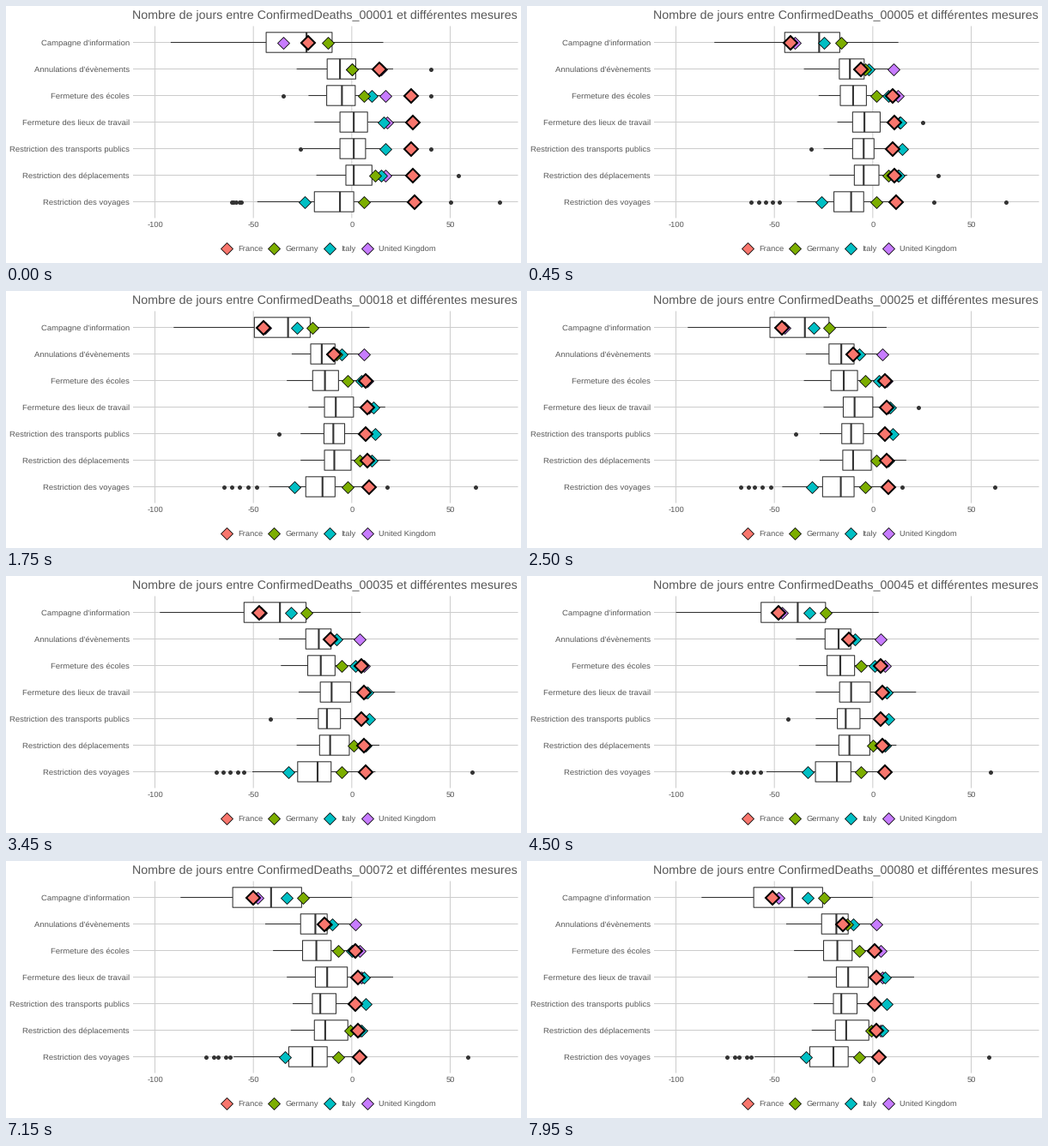
These frames come from a looping animation (600x300 px, 8 s). A matplotlib script:

```python
import numpy as np
import matplotlib.pyplot as plt
from matplotlib.animation import FuncAnimation
from matplotlib.collections import LineCollection, PolyCollection

W, H, DPI = 600, 300, 100
PT = 72 / DPI                      # points per pixel
FRAMES, STEP, LAST = 160, 50, 80
INK, LINE, GRID = "#575757", "#333333", "#cccccc"

plt.rcParams["font.family"] = "Liberation Sans"
plt.rcParams["text.hinting"] = "none"
fig = plt.figure(figsize=(W / DPI, H / DPI), dpi=DPI, facecolor="white")
ax = fig.add_axes([0, 0, 1, 1])
ax.set_xlim(0, W)
ax.set_ylim(H, 0)
ax.axis("off")

# One state per death count; states are spread evenly over the frames
STATES = np.arange(1, LAST + 1)
STATE_FRAMES = np.round((STATES - 1) * (FRAMES - 1) / (LAST - 1))


def px(days):
    return 402.85 + 2.293 * np.asarray(days, float)


def row_y(row):
    return 42.5 + 31.0 * np.asarray(row, float)


def drift(first, early, late, grid=1.0):
    """Logarithmic drift through states 1, 11 and 72, in whole data steps."""
    v = np.interp(np.log(STATES), np.log([1, 11, 72]), [first, early, late])
    return np.round(v / grid) * grid


def label(x, y, s, size, ha):
    return ax.text(x, y, s, fontsize=size * PT, color=INK, ha=ha, va="baseline")


def diamond(color, x=(), y=(), size=10.3, edge=0.8):
    return ax.plot(x, y, "D", ms=size * PT, mfc=color, mec="black",
                   mew=edge * PT, zorder=6, snap=False)[0]


class Measure:
    """Box plot: strays within 1.5 box widths stretch a whisker, others are dots."""

    def __init__(self, name, low, q1, med, q3, high, strays=()):
        self.name = name
        q1, med, q3 = (drift(*q, grid=0.25) for q in (q1, med, q3))
        low, high = drift(*low), drift(*high)
        reach = 1.5 * (q3 - q1)
        self.dots = []
        for *keys, until in strays:
            v = drift(*keys)
            live = STATES <= until
            inside = (v >= q1 - reach) & (v <= q3 + reach)
            low = np.where(live & inside, np.minimum(low, v), low)
            high = np.where(live & inside, np.maximum(high, v), high)
            self.dots.append(np.where(live & ~inside, v, np.nan))
        self.box = [low, q1, med, q3, np.maximum(high, q3)]


MEASURES = [
    Measure("Campagne d'information",
            (-70, -75, -87), (-43.5, -45.25, -60.5), (-23, -29, -41),
            (-10, -19.5, -25.5), (16, 12, 0), [(-92, -85, -105, 59)]),
    Measure("Annulations d'évènements",
            (-28, -25, -44), (-12.5, -19, -26), (-6, -14, -18.5),
            (2, -7, -12.5), (21, 6, 2), [(40, 6, 2, 3), (-28, -38, -38, 14)]),
    Measure("Fermeture des écoles",
            (-22, -30, -40), (-12.75, -18, -25), (-5, -12, -18),
            (1.75, -5.25, -10.5), (17, 8, 4), [(40, 8, 4, 3), (-35, -35, -35, 3)]),
    Measure("Fermeture des lieux de travail",
            (-19, -18, -33), (-6, -12, -18.5), (1, -6.5, -12.5),
            (8, 2, -2.25), (18, 13, 5), [(29, 24, 21, LAST)]),
    Measure("Restriction des transports publics",
            (-25, -25, -30), (-6, -12, -20), (1, -7, -16),
            (7, -2, -8), (17, 7, 6), [(40, 7, 6, 3), (-26, -34, -46, 50)]),
    Measure("Restriction des déplacements",
            (-18, -24, -31), (-3, -12, -19), (1, -7, -13.5),
            (10.25, 0.25, -2), (30, 12, 4), [(54, 24, 8, LAST)]),
    Measure("Restriction des voyages",
            (-48, -35, -60), (-19, -20, -32), (-6, -13, -20),
            (1, -7, -12.5), (31, 9, 4),
            [(75, 64, 59, LAST), (50, 23, 5, LAST)]
            + [(-61 + 1.2 * k, -62 + 4.6 * k, -73.5 + 3 * k, LAST)
               for k in range(5)]),
]
BOXES = np.array([m.box for m in MEASURES])
DOTS = np.array([d for m in MEASURES for d in m.dots])
DOT_ROWS = [r for r, m in enumerate(MEASURES) for _ in m.dots]


class Country:
    """Whole days drop along a bent line; each measure has a fixed offset."""

    def __init__(self, name, color, bends, offsets, **style):
        self.name, self.color = name, color
        self.path = np.round(np.interp(STATES, *zip(*bends)))
        self.rows = list(offsets)
        self.offsets = np.array(list(offsets.values()))
        self.marks = diamond(color, **style)

    def place(self, t):
        day = np.interp(t, STATES, self.path)
        self.marks.set_data(px(day + self.offsets), row_y(self.rows))


COUNTRIES = [
    Country("United Kingdom", "#C77CFF",
            [(1, 15), (3, 12), (11, 6.4), (26, 5), (72, 2), (80, 1.6)],
            {0: -50, 1: 0, 2: 2, 3: 3, 5: 2}),
    Country("Italy", "#00BFC4",
            [(1, 16), (3, 14), (12, 12.6), (26, 9), (46, 6.8), (80, 5.6)],
            {0: -39, 1: -16, 2: -6, 3: 0, 4: 1, 5: -1, 6: -40}),
    Country("Germany", "#7CAE00",
            [(1, 6), (4, 3), (7, 1), (12, 0), (26, -4), (45, -6), (72, -7)],
            {0: -18, 1: -6, 2: 0, 5: 6, 6: 0}),
    Country("France", "#F8766D",
            [(1, 30), (2, 18), (3, 13), (5, 10), (11, 7.4), (26, 6), (80, 1)],
            {0: -52, 1: -16, 2: 0, 3: 1, 4: 0, 5: 1, 6: 2}, size=10.8, edge=2),
]

# Grid, axis labels and legend
for d in range(-100, 51, 50):
    ax.plot([px(d)] * 2, [24, 247], color=GRID, lw=PT, zorder=1, snap=False)
    label(px(d), 258, str(d), 9.4, "center")
for r, m in enumerate(MEASURES):
    ax.plot([148.5, 596], [row_y(r)] * 2, color=GRID, lw=PT, zorder=1, snap=False)
    label(144, row_y(r) + 3.3, m.name, 9.5, "right")
for c, x in zip(reversed(COUNTRIES), (257, 312.3, 376.7, 421)):
    diamond(c.color, [x], [282.5])
    label(x + 13, 286, c.name, 9.35, "left")

title = label(596, 15, "", 14.3, "right")
whiskers = LineCollection([], colors=LINE, lw=1.07 * PT, zorder=2)
boxes = PolyCollection([], facecolors="white", edgecolors=LINE,
                       lw=1.07 * PT, zorder=3)
medians = LineCollection([], colors=LINE, lw=2.1 * PT, zorder=4)
for c in (whiskers, boxes, medians):
    c.set_snap(False)
    ax.add_collection(c, autolim=False)
points, = ax.plot([], [], "o", ms=5 * PT, mfc=LINE, mew=0, zorder=5, snap=False)


def tween(table, t):
    """Blend the two states around t along the last axis."""
    a = int(t) - 1
    f = t - int(t)
    return table[..., a] if f == 0 else table[..., a] * (1 - f) + table[..., a + 1] * f


def draw(i):
    t = np.interp(i, STATE_FRAMES, STATES)
    lines, rects, mids = [], [], []
    for r, (low, q1, med, q3, high) in enumerate(px(tween(BOXES, t))):
        y = row_y(r)
        top, bottom = y - 11.7, y + 11.7
        lines += [[(low, y), (q1, y)], [(q3, y), (high, y)]]
        rects.append([(q1, top), (q3, top), (q3, bottom), (q1, bottom)])
        mids.append([(med, top), (med, bottom)])
    whiskers.set_segments(lines)
    boxes.set_verts(rects)
    medians.set_segments(mids)
    points.set_data(px(tween(DOTS, t)), row_y(DOT_ROWS))
    for c in COUNTRIES:
        c.place(t)

    count = 1 + (LAST - 1) * i // (FRAMES - 1)
    title.set_text(f"Nombre de jours entre ConfirmedDeaths_{count:05d}"
                   " et différentes mesures")
    return [title, whiskers, boxes, medians, points]


anim = FuncAnimation(fig, draw, frames=FRAMES, interval=STEP,
                     init_func=lambda: draw(0), repeat=True, repeat_delay=0)
plt.show()
```
